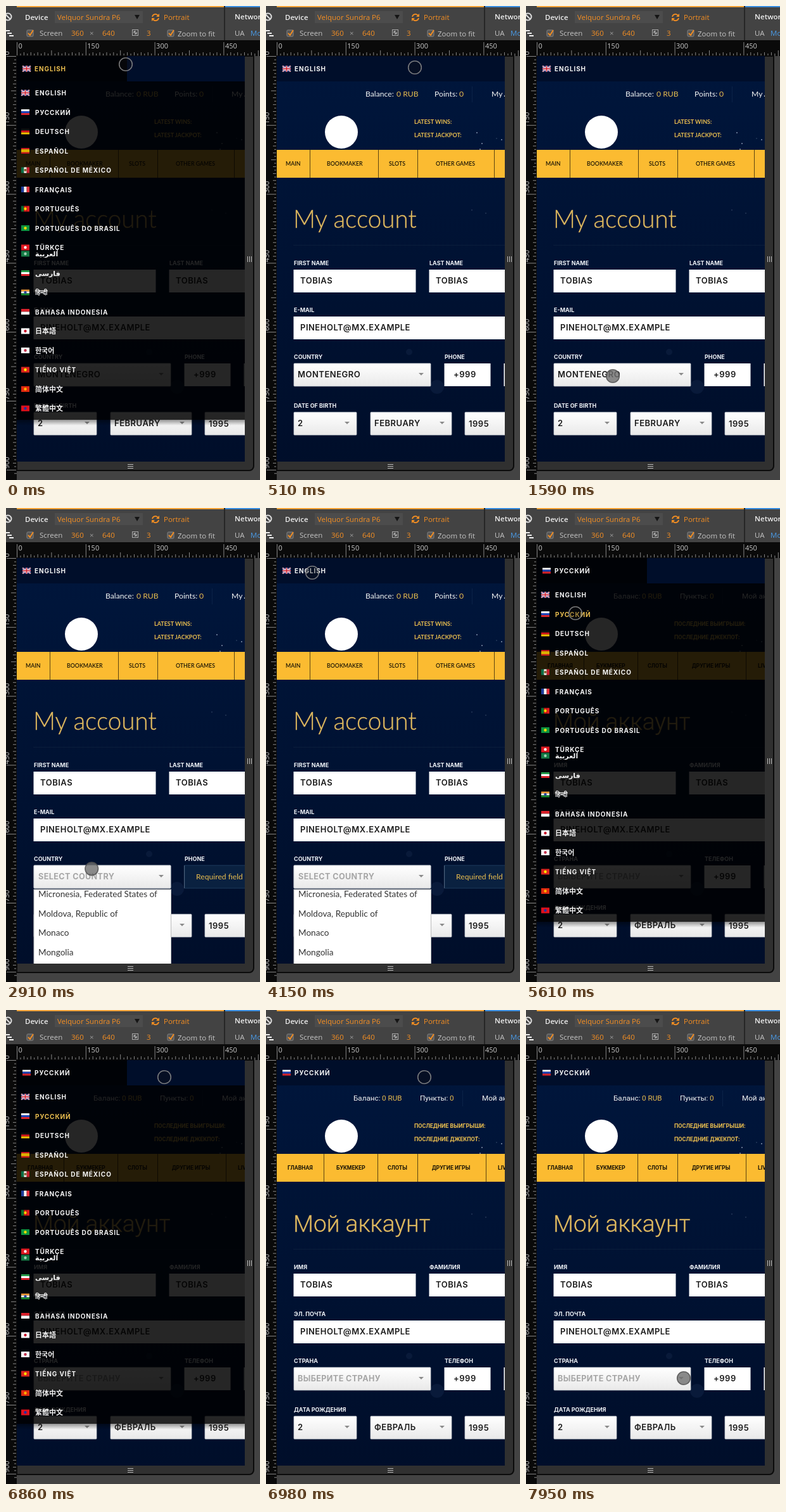
An HTML page that plays this animation: 401 by 748 pixels, repeating every 8 s.

```html
<!DOCTYPE html>
<html lang="en">
<head>
<meta charset="utf-8">
<title>Language menu</title>
<style>
html, body { margin: 0; width: 100%; height: 100%; overflow: hidden; background: #434343; }
svg { display: block; width: 401px; height: 748px; }
text { white-space: pre; }
.ui { font: 11.5px "Open Sans", "Noto Sans", sans-serif; }
.strong { font-weight: 600; }
.ruler { font: 11px "Open Sans", "Noto Sans", sans-serif; fill: #ccc; }
.en { font-family: Lato, sans-serif; }
.ru { font-family: Roboto, "Noto Sans", sans-serif; }
.title { font-size: 38.6px; font-weight: 300; fill: #e0b95f; stroke: #e0b95f; stroke-width: .35px; }
.ru .title { font-size: 37px; }
.info { font-size: 12.2px; }
.ru .info { font-size: 11.7px; }
.small { font-size: 9px; font-weight: 700; }
.nav { font-size: 8.8px; font-weight: 600; fill: #1c1606; }
.label { font: 700 9px Inter, sans-serif; fill: #eef1f6; }
.value { font: 600 13px Inter, sans-serif; letter-spacing: .5px; fill: #1b1b1b; }
.hint { font: 700 12.6px Inter, sans-serif; letter-spacing: .4px; fill: #a6a6a6; }
.option { font: 13.6px Lato, sans-serif; fill: #333; }
.lang { font: 700 10px Inter, "Noto Sans", "Noto Sans CJK SC", "DejaVu Sans", sans-serif; letter-spacing: .9px; fill: #f4f4f4; }
.script { letter-spacing: 0; font-size: 11px; }
</style>
</head>
<body>
<svg id="stage" viewBox="0 0 401 748"></svg>
<script>
const ORANGE = '#f68f22', GOLD = '#e9bd4f', WHITE = '#f4f4f4', GREY = '#c4c4c4', PANEL = '#434343';
const LOOP = 8000;

const rect = (x, y, w, h, fill, extra = '') =>
  `<rect x="${x}" y="${y}" width="${w}" height="${h}" fill="${fill}" ${extra}/>`;
const circle = (x, y, r, fill, extra = '') =>
  `<circle cx="${x}" cy="${y}" r="${r}" fill="${fill}" ${extra}/>`;
const path = (d, stroke, width = 1, fill = 'none') =>
  `<path d="${d}" stroke="${stroke}" stroke-width="${width}" fill="${fill}"/>`;
const text = (x, y, s, cls, fill = '', extra = '') =>
  `<text x="${x}" y="${y}" class="${cls}" ${fill && `style="fill:${fill}"`} ${extra}>${s}</text>`;
const group = (id, body, extra = '') => `<g id="${id}" ${extra}>${body}</g>`;

function ruler() {
  const step = 5.44;
  let d = '', out = rect(0, 54, 401, 25, '#0a0a0a') + rect(0, 54, 17, 694, '#0a0a0a');
  for (let i = 0; i < 122; i++) {
    const size = i % 10 === 0 ? 9 : i % 2 ? 4 : 6;
    const x = 17.5 + i * step, y = 79.5 + i * step;
    if (x < 401) d += `M${x} 79v${i % 20 ? -size : -22}`;
    d += `M17 ${y}h${i % 20 ? -size : -16}`;
    if (i % 20 === 0) {
      const n = i * 7.5;
      if (x < 392) out += text(x + 2, 67, n, 'ruler');
      out += text(0, 0, n, 'ruler', '', `transform="translate(5 ${y - 2}) rotate(-90)"`);
    }
  }
  return out + path(d, '#a8a8a8', .8);
}

function checkbox(x) {
  return rect(x - 5, 38, 10, 10, '#555', 'rx="1.5" stroke="#888"') +
    path(`M${x - 3} 43l3 3 5-8`, ORANGE, 1.8);
}

function toolbar() {
  return rect(0, 0, 401, 54, PANEL) +
    rect(17, 0, 327, 2, '#f2a33a') + rect(346, 0, 55, 2, '#3c8fe0') +
    rect(344, 0, 2, 54, '#262626') +
    circle(3, 17, 5.5, 'none', 'stroke="#ddd" stroke-width="2"') + path('M-1 13l8 8', '#ddd', 2) +
    path('M0 39h6M2 43h7M5 47h7', '#eee', 2) +
    text(30, 22, 'Device', 'ui strong', '#eee') +
    rect(77, 8, 139, 19, '#4c4c4c') + text(81, 22, 'Velquor Sundra P6', 'ui', ORANGE) +
    path('M203 14h8l-4 7z', 'none', 0, '#151515') +
    path('M231 17a5 5 0 0 1 9-2M241 19a5 5 0 0 1-9 2', ORANGE, 1.8) +
    path('M242 12v5h-5zM230 24v-5h5z', 'none', 0, ORANGE) +
    text(249, 22, 'Portrait', 'ui', ORANGE) + text(361, 21, 'Network', 'ui strong', '#eee') +
    checkbox(38) + text(53, 47, 'Screen', 'ui', GREY) +
    text(103, 47, '360', 'ui', ORANGE) + text(132, 47, '×', 'ui', '#999') + text(152, 47, '640', 'ui', ORANGE) +
    rect(199.5, 37.5, 9, 9, 'none', 'stroke="#aaa"') + path('M202 40l4 4M202 43v-3h3M206 41v3h-3', '#ccc') +
    text(222, 47, '3', 'ui', ORANGE) + checkbox(260) + text(271, 48, 'Zoom to fit', 'ui', GREY) +
    text(361, 47, 'UA', 'ui', GREY) + text(386, 47, 'Mobile', 'ui', '#4a9be8');
}

function frame() {
  return rect(377, 79, 24, 669, PANEL) + rect(17, 719, 384, 29, PANEL) +
    path('M17 79H391V726a7 7 0 0 1-7 7H17z', '#0b0b0b', 2, '#303030') +
    path('M381.5 395v9M384.5 395v9M387.5 395v9M192 723.5h9M192 726.5h9M192 729.5h9', '#bbb');
}

const field = (x, y, w) => rect(x - .5, y, w + 1, 36, '#fff');
const arrow = (x, y) => path(`M${x - 4} ${y - 2}h8l-4 4z`, 'none', 0, '#8b8b8b');
const select = (x, y, w) =>
  rect(x, y, w, 36, 'url(#select)', 'rx="1" stroke="#c4c8ce" stroke-width=".8"') + arrow(x + w - 15, y + 17);

function pageBase() {
  const stars = [[333, 200], [341, 217], [338, 226], [372, 211], [325, 322], [347, 327], [364, 209]];
  return rect(17, 79, 360, 640, 'url(#sky)') + rect(17, 79, 360, 40, '#000e2a') +
    stars.map(([x, y], i) => circle(x, y, 1, '#b9c7de', `opacity="${i > 3 ? .2 : .7}"`)).join('') +
    circle(226, 546, 5, '#0f2242', 'opacity=".6"') + circle(270, 601, 11, '#0f2242', 'opacity=".6"') +
    circle(119, 199, 26, '#fff') +
    rect(17, 227, 360, 44, '#fbbb31') + rect(43, 377, 334, 1, '#0b1d3c') +
    field(44, 416, 192) + field(258, 416, 130) + field(44, 490, 350) +
    select(44, 564, 216) + field(282, 564, 72) + field(376, 564, 20) +
    select(44, 641, 99) + select(165, 641, 128) + select(314, 641, 110) +
    text(54, 438, 'TOBIAS', 'value') + text(268, 438, 'TOBIAS', 'value') +
    text(54, 512, 'PINEHOLT@MX.EXAMPLE', 'value') + text(296, 586, '+999', 'value') +
    text(50, 663, '2', 'value') + text(320, 664, '1995', 'value');
}

function pageText(id, c) {
  const labelAt = [[44, 409], [258, 409], [44, 483], [44, 557], [282, 557], [44, 634]];
  const [bx, bv, px, pv, line, ax] = c.infoX;
  return group(id,
    text(bx, 143, c.info[0], 'info', WHITE) + text(bv, 143, '0 RUB', 'info', GOLD) +
    text(px, 143, c.info[1], 'info', WHITE) + text(pv, 143, '0', 'info', GOLD) +
    rect(line, 127, 1, 25, '#0c2348') + text(ax, 143, c.info[2], 'info', WHITE) +
    text(234, 186, c.latest[0], 'small', GOLD) + text(234, 207, c.latest[1], 'small', GOLD) +
    c.nav.map((s, i) => text(c.navX[i], 252, s, 'nav')).join('') +
    c.split.map(x => rect(x, 227, 1, 44, '#5d4510')).join('') +
    text(43, 350, c.title, 'title') +
    c.labels.map((s, i) => text(...labelAt[i], s, 'label')).join('') +
    text(50, 586, c.country, c.countryClass) + text(171, 663, c.month, 'value'),
    `class="${id}"`);
}

const english = {
  info: ['Balance:', 'Points:', 'My Account'], infoX: [157, 206, 266, 305, 325, 356],
  latest: ['LATEST WINS:', 'LATEST JACKPOT:'],
  nav: ['MAIN', 'BOOKMAKER', 'SLOTS', 'OTHER GAMES'], navX: [31, 96, 194, 268],
  split: [69, 177, 239, 360], title: 'My account',
  labels: ['FIRST NAME', 'LAST NAME', 'E-MAIL', 'COUNTRY', 'PHONE', 'DATE OF BIRTH'],
  country: 'MONTENEGRO', countryClass: 'value', month: 'FEBRUARY'
};
const russian = {
  info: ['Баланс:', 'Пункты:', 'Мой аккаунт'], infoX: [138, 183, 243, 290, 310, 341],
  latest: ['ПОСЛЕДНИЕ ВЫИГРЫШИ:', 'ПОСЛЕДНИЕ ДЖЕКПОТ:'],
  nav: ['ГЛАВНАЯ', 'БУКМЕКЕР', 'СЛОТЫ', 'ДРУГИЕ ИГРЫ', 'LIVE'], navX: [34, 111, 192, 262, 366],
  split: [91, 176, 239, 347], title: 'Мой аккаунт',
  labels: ['ИМЯ', 'ФАМИЛИЯ', 'ЭЛ. ПОЧТА', 'СТРАНА', 'ТЕЛЕФОН', 'ДАТА РОЖДЕНИЯ'],
  country: 'ВЫБЕРИТЕ СТРАНУ', countryClass: 'hint', month: 'ФЕВРАЛЬ'
};

function countryList() {
  const names = ['Micronesia, Federated States of', 'Moldova, Republic of', 'Monaco', 'Mongolia'];
  return select(44, 564, 216) + text(51, 586, 'SELECT COUNTRY', 'hint') +
    rect(44, 602, 216.5, 118, '#fff', 'stroke="#bbb"') +
    names.map((s, i) => text(51, 614 + i * 30.6, s, 'option')).join('') +
    rect(282, 564, 100, 36, '#0a2140', 'stroke="#1c3b5d"') +
    text(300, 586, 'Required field', 'en info', GOLD);
}

// Flag spec: direction, stripe colours, then an optional "*" emblem colour.
const languages = [
  ['ENGLISH', 'uk'], ['РУССКИЙ', 'h #fff #1c44b8 #d8232a'], ['DEUTSCH', 'h #111 #d8141c #f5c400'],
  ['ESPAÑOL', 'h #c8171e #f7c600 #f7c600 #c8171e'], ['ESPAÑOL DE MÉXICO', 'v #0b7048 #fff #c8202f *#8a6a3a'],
  ['FRANÇAIS', 'v #1d3c9c #fff #e5303c'], ['PORTUGUÊS', 'v #0a6b2c #e01b1b #e01b1b *#f5d000'],
  ['PORTUGUÊS DO BRASIL', 'h #0c9440 *#f6d900'], ['TÜRKÇE', 'h #e01a22 *#fff'],
  ['العربية', 'h #157a45 *#9fd0b4'], ['فارسی', 'h #259b48 #fff #d8202a'],
  ['हिन्दी', 'h #f49a35 #fff #158a2c *#28459a'], ['BAHASA INDONESIA', 'h #d9202a #fff'],
  ['日本語', 'h #fff *#c9102c'], ['한국어', 'h #fff *#c3304a'], ['TIẾNG VIỆT', 'h #da251d *#ffeb00'],
  ['简体中文', 'h #de2910 *#ffb000'], ['繁體中文', 'h #e0101c *#2432a0']
];

function flag(x, y, spec) {
  const w = 13, h = 9;
  if (spec === 'uk') {
    const cross = 'M6.5 0v9M0 4.5h13', saltire = 'M0 0l13 9M13 0L0 9';
    return `<g transform="translate(${x} ${y})">` + rect(0, 0, w, h, '#27398f') + path(saltire, '#fff', 1.8) +
      path(saltire, '#d02030', .7) + path(cross, '#fff', 3) + path(cross, '#d02030', 1.7) + '</g>';
  }
  const [dir, ...rest] = spec.split(' ');
  const bands = rest.filter(c => c[0] !== '*'), emblem = rest.find(c => c[0] === '*');
  const n = bands.length;
  return bands.map((c, i) => dir === 'h' ? rect(x, y + i * h / n, w, h / n, c)
    : rect(x + i * w / n, y, w / n, h, c)).join('') +
    (emblem ? circle(x + w / 2, y + h / 2, 2.2, emblem.slice(1)) : '');
}

function menu() {
  const rows = languages.map(([name, spec], i) => {
    const y = 137 + i * 30.5 - (i > 8 ? 20.5 : 0);
    const script = /[A-ZА-Я]/.test(name) ? '' : ' script';
    return flag(24, y - 4.5, spec) + text(46, y + 4, name, 'lang' + script, '', `id="row${i}"`);
  }).join('');
  return path('M17 79H191V119H377V653H17z', 'none', 0, 'rgba(0,0,0,.85)') +
    rect(17, 653, 360, 9, 'url(#shade)') + rows;
}

const heading = (id, i) =>
  group(id, flag(26, 94.5, languages[i][1]) + text(45, 103, languages[i][0], 'lang', '', `id="${id}Name"`));

const gradient = (id, a, b) => `<linearGradient id="${id}" x2="0" y2="1"><stop stop-color="${a}"/>` +
  `<stop offset="1" stop-color="${b}"/></linearGradient>`;

document.getElementById('stage').innerHTML =
  '<defs>' + gradient('sky', '#00163c', '#000e2a') + gradient('select', '#fff', '#e9e9e9') +
  gradient('shade', 'rgba(0,0,0,.4)', 'rgba(0,0,0,0)') +
  '<clipPath id="screen">' + rect(17, 79, 360, 640, '#fff') + '</clipPath></defs>' +
  ruler() + toolbar() + frame() +
  group('page', pageBase() + pageText('en', english) + pageText('ru', russian) +
    group('list', countryList()) + group('menu', menu()) + heading('headEn', 0) + heading('headRu', 1),
    'clip-path="url(#screen)"') +
  circle(0, 0, 10.3, '#000', 'id="cursor" stroke-width="1.6"');

const el = id => document.getElementById(id);
const show = (id, on) => { el(id).style.display = on ? '' : 'none'; };
const between = (t, a, b) => t >= a && t < b;

const smooth = p => p * p * (3 - 2 * p);
const lateStart = p => p ** 3.5;

// Pointer moves: first step, last step, step count, end point, easing, sideways bow.
const moves = [
  [120, 510, 4, 235, 97, smooth, 0],
  [780, 1590, 7, 137, 584, smooth, 0],
  [2610, 3540, 8, 83, 130, lateStart, 0],
  [3690, 4150, 4, 73, 102, smooth, 0],
  [4270, 4690, 4, 74, 131, smooth, 0],
  [4840, 4970, 2, 78, 166, smooth, 0],
  [6290, 6860, 5, 250, 106, smooth, 0],
  [7250, 7950, 6, 249, 581, smooth, -24]
];

function pointer(t) {
  let x = 189, y = 92;
  for (const [from, to, steps, endX, endY, ease, bow] of moves) {
    if (t < from) break;
    const k = Math.min(steps, Math.floor((t - from) / (to - from) * (steps - 1) + 1e-6) + 1);
    const p = ease(k / steps);
    x += (endX - x) * p + bow * Math.sin(Math.PI * p);
    y += (endY - y) * p;
  }
  return [x, y];
}

function render(t) {
  const isRussian = t >= 5425;
  const menuOpen = t < 250 || between(t, 4400, 6980);
  show('en', !isRussian);
  show('ru', isRussian);
  show('headEn', !isRussian);
  show('headRu', isRussian);
  show('list', between(t, 2020, 4400));
  show('menu', menuOpen);
  el('headEnName').style.fill = menuOpen && t < 5240 ? GOLD : WHITE;
  el('row1').style.fill = t >= 5240 ? GOLD : WHITE;

  const [x, y] = pointer(t);
  const pressed = between(t, 1590, 2020) || between(t, 2740, 3040) || t >= 7950;
  const cursor = el('cursor');
  cursor.setAttribute('transform', `translate(${x} ${y})`);
  cursor.setAttribute('fill', pressed ? 'rgba(110,110,110,.8)' : 'rgba(20,20,20,.3)');
  cursor.setAttribute('stroke', pressed ? 'rgba(80,80,80,.85)' : 'rgba(140,140,140,.85)');
}

function tick() {
  render(performance.now() % LOOP);
  requestAnimationFrame(tick);
}
tick();
</script>
</body>
</html>
```
